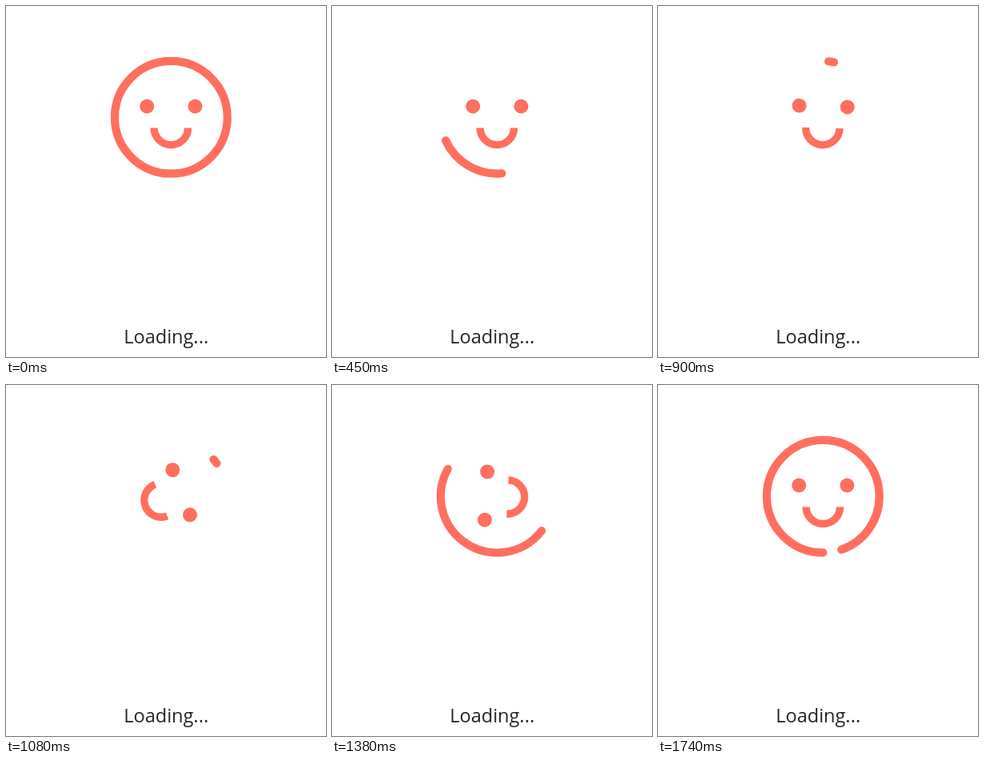
Write an HTML page with a canvas that moves like this. It is 400 px wide and 439 px high and loops after 1.77 s.

```html
<!DOCTYPE html>
<html lang="en">
<head>
<meta charset="utf-8">
<title>Loading</title>
<style>
  html, body { margin: 0; width: 100%; height: 100%; overflow: hidden; background: #fff; }
  canvas { display: block; }
</style>
</head>
<body>
<canvas id="stage" width="400" height="439"></canvas>
<script>
const ctx = document.getElementById('stage').getContext('2d');
const LOOP = 1770, STEP = 30;
const CX = 206.3, CY = 139.3, RING = 70.4;
const CORAL = '#ff6f5f', INK = '#262626';
const RAD = Math.PI / 180;

function progress(t, from, to) {
  return Math.min(1, Math.max(0, (t - from) / (to - from)));
}

function smooth(t, from, to) {
  const u = progress(t, from, to);
  return u * u * (3 - 2 * u);
}

function arc(x, y, r, from, to, width, cap) {
  ctx.beginPath();
  ctx.arc(x, y, r, from * RAD, to * RAD);
  ctx.lineWidth = width;
  ctx.lineCap = cap;
  ctx.stroke();
}

function dot(x, y, r) {
  ctx.beginPath();
  ctx.arc(x, y, r, 0, 2 * Math.PI);
  ctx.fill();
}

// The ring turns, shrinks to a short dash, then grows back.
function drawRing(t) {
  const turn = 270 * smooth(t, 0, 1400) + 95 * smooth(t, 1170, 1620);
  const left = 355 * Math.exp(-Math.pow(t / 340, 1.87));
  const u = progress(t, 1090, 1740);
  const grown = 336 * u * (1.2 - 0.2 * u);
  const start = 90 + turn - left - 5;
  arc(CX, CY, RING, start, start + 5 + left + grown, 10.2, 'round');
}

function drawFace(t) {
  ctx.save();
  ctx.translate(CX, CY);
  ctx.rotate(2 * Math.PI * smooth(t, 870, 1620));
  dot(-30.1, -13.8, 9);
  dot(30.1, -13.8, 9);
  arc(0, 13.2, 21.2, 0, 180, 9.4, 'butt');
  ctx.restore();
}

function draw(t) {
  ctx.fillStyle = '#fff';
  ctx.fillRect(0, 0, 400, 439);
  ctx.fillStyle = ctx.strokeStyle = CORAL;
  drawRing(t);
  drawFace(t);
  ctx.fillStyle = INK;
  ctx.font = '23.5px "Open Sans", sans-serif';
  ctx.textAlign = 'center';
  ctx.fillText('Loading...', 200.2, 422);
}

let begin;
function tick(now) {
  if (begin === undefined) begin = now;
  const t = Math.max(0, now - begin) % LOOP;
  draw(Math.floor(t / STEP) * STEP);
  requestAnimationFrame(tick);
}
draw(0);
requestAnimationFrame(tick);
</script>
</body>
</html>
```
